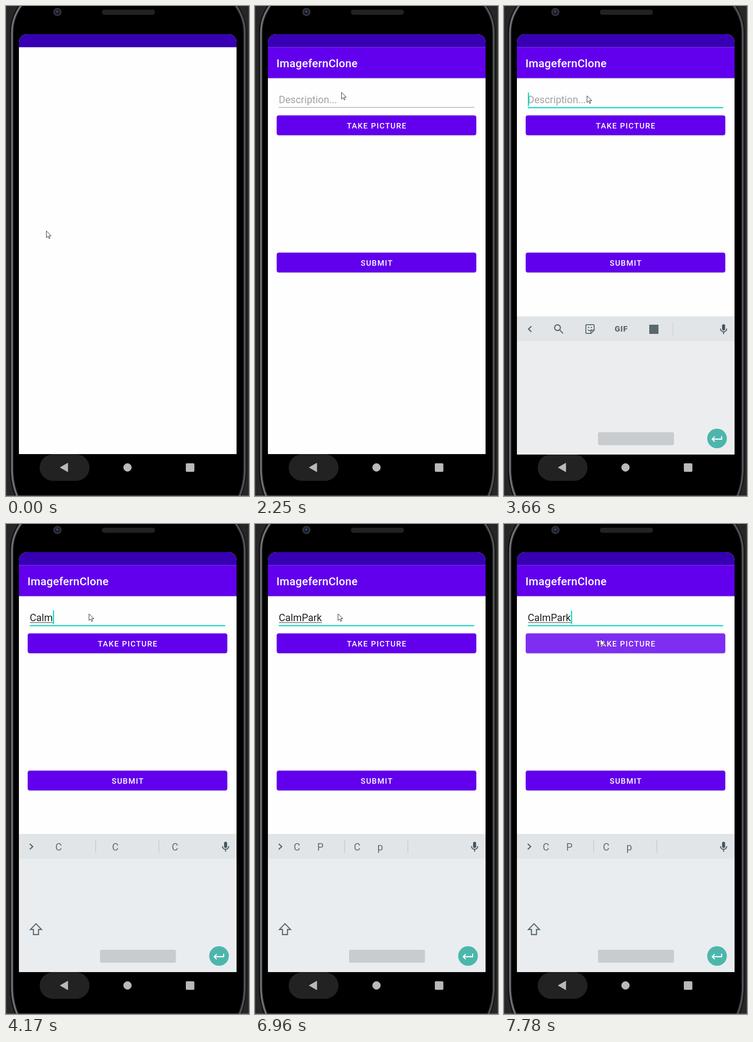
Write an HTML page that moves like this. It is 527 px wide and 1064 px high and loops after 8000 ms.

```html
<!DOCTYPE html>
<html lang="en">
<head>
<meta charset="utf-8">
<title>Photo post form</title>
<style>
  html, body { margin: 0; width: 100%; height: 100%; overflow: hidden; background: #000; }
  svg { display: block; width: 100%; height: 100%; }
  text { font-family: Roboto, sans-serif; font-size: 21.6px; white-space: pre; }
  .medium { font-weight: 500; fill: #fff; }
  .label { font-size: 16.8px; letter-spacing: 1.5px; text-anchor: middle; }
  .line { fill: none; stroke: #5a686e; stroke-width: 2.4; }
  #suggestions text { fill: #626c71; }
</style>
</head>
<body>
<svg viewBox="0 0 527 1064">
  <defs>
    <path id="edge" d="M33-2C22 14 13 32 13 58V1005C13 1030 17 1048 26 1068"/>
    <g id="side" fill="none">
      <use href="#edge" stroke="#0a0a0a" stroke-width="9"/>
      <use href="#edge" stroke="#4b4e50" stroke-width="5"/>
      <use href="#edge" stroke="#74797c" stroke-width="2.400"/>
    </g>
    <clipPath id="screen"><path d="M28 973V79a18 18 0 0 1 18-18H482a18 18 0 0 1 18 18V973z"/></clipPath>
    <g id="button">
      <rect x="47" y="1" width="433" height="43" rx="4.500" opacity=".18"/>
      <rect x="47" width="433" height="43" rx="4.500" fill="#6200ee"/>
    </g>
  </defs>

  <!-- Phone body -->
  <rect width="527" height="1064" fill="#262626"/>
  <path d="M.5 0V1064M526.5 0V1064" stroke="#484848"/>
  <path d="M33-2C22 14 13 32 13 58V1005C13 1030 17 1048 26 1068H504C513 1048 517 1030 517 1005V58C517 32 508 14 497-2z"/>
  <use href="#side"/>
  <use href="#side" transform="translate(530.500) scale(-1 1)" opacity=".65"/>
  <path d="M0 1063.5H527" stroke="#777"/>
  <circle cx="111.500" cy="13" r="9" fill="#303032"/>
  <circle cx="111.500" cy="13" r="5.500" fill="#171d30"/>
  <circle cx="111" cy="12" r="2" fill="#3c5289"/>
  <rect x="208" y="8" width="115" height="11" rx="5" fill="#222"/>

  <!-- Navigation bar -->
  <rect x="73" y="973.500" width="108" height="57.500" rx="28.700" fill="#222"/>
  <g fill="#b9b9b9" stroke="#b9b9b9" stroke-linejoin="round">
    <path d="M117.500 1002L134 992.500V1011.500z"/>
    <circle cx="263.500" cy="1002" r="8.500"/>
    <rect x="390.500" y="993.500" width="17.500" height="17.500" rx="1.500"/>
  </g>

  <!-- App -->
  <g clip-path="url(#screen)">
    <rect x="28" y="61" width="472" height="912" fill="#fefefe"/>
    <rect x="28" y="61" width="472" height="28.500" fill="#3700b3"/>
    <g id="form">
      <rect x="28" y="156" width="472" height="2" opacity=".14"/>
      <rect x="28" y="89.500" width="472" height="67" fill="#6200ee"/>
      <text x="46.500" y="133" class="medium" style="font-size:24.04px;letter-spacing:.3px">ImagefernClone</text>
      <text id="hint" x="51.500" y="211" fill="#a3a3a3">Description...</text>
      <text id="entry" x="51.500" y="211" fill="#222"></text>
      <rect id="composing" x="52" y="213.500" height="1.300" fill="#555"/>
      <rect id="underline" x="51.500" y="219.600" width="424"/>
      <rect id="caret" y="188" width="2.400" height="29.500" fill="#03dac5"/>
      <use href="#button" y="237.500"/>
      <rect id="pressed" x="47" y="237.500" width="433" height="43" rx="4.500" fill="#fff"/>
      <text x="264.300" y="266" class="medium label">TAKE PICTURE</text>
      <use href="#button" y="535.500"/>
      <text x="264.300" y="564" class="medium label">SUBMIT</text>
    </g>
  </g>

  <!-- Keyboard -->
  <g id="keyboard">
    <rect id="keys" x="28" y="673" width="472" height="300"/>
    <rect x="28" y="673" width="472" height="53.500" fill="#e1e5e8"/>
    <g id="tools" class="line">
      <path d="M59.500 694.500L53 700.500L59.500 706.500"/>
      <circle cx="116" cy="697.500" r="6.300"/>
      <path d="M120.500 702L128 710"/>
      <path d="M179.500 691H193.500Q195.500 691 195.500 693V703L188.500 710H179.500Q177.500 710 177.500 708V693Q177.500 691 179.500 691zM195 703H188.500V710" stroke-width="2"/>
      <path d="M182 702Q186 706.500 190.500 701.500M182 697H185M188 697H191" stroke-width="1.900"/>
      <text x="240" y="706" style="font-size:17px;font-weight:900;letter-spacing:.9px" fill="#5a686e" stroke="none">GIF</text>
      <rect x="315" y="691" width="20" height="20" fill="#5a686e" stroke="none"/>
      <path d="M366.500 687V714" stroke="#c5cacd" stroke-width="1.200"/>
    </g>
    <g id="candidates">
      <path class="line" d="M51.500 694.500L58 700.500L51.500 706.500"/>
      <path d="M194.500 686V714M331.500 686V714" stroke="#bfc4c7" stroke-width="1.200"/>
      <g id="suggestions"></g>
      <path class="line" d="M65 868L53 880.500H59.500V891.500H70.500V880.500H77z"/>
    </g>
    <rect x="473" y="690" width="6.500" height="13.500" rx="3.200" fill="#46555c"/>
    <path class="line" d="M469.500 699.500A6.700 7 0 0 0 483 699.500M476.200 706.500V711.500" stroke-width="2"/>
    <rect x="204" y="924.500" width="164.500" height="28" rx="3" fill="#c8cccf"/>
    <circle cx="462" cy="938" r="21.300" fill="#4db6ac"/>
    <path d="M472 933V939.500H452M457 934L451.500 939.500L457 945" fill="none" stroke="#fff" stroke-width="2.300"/>
  </g>

  <path id="pointer" d="M.5.5V15L4 11.800L6.300 17L8.600 16L6.300 11H11z" fill="#fff" stroke="#222"/>
</svg>
<script>
const LOOP = 8000;
const el = id => document.getElementById(id);
const show = (id, on) => { el(id).style.display = on ? '' : 'none'; };
const set = (id, attrs) => {
  for (const name in attrs) el(id).setAttribute(name, attrs[name]);
};

// Every track is a list of [start time, ...values] held until the next entry.
const at = (track, t) => track.findLast(step => step[0] <= t).slice(1);

const pointer = [
  [0, 87, 488], [1670, 117, 363], [1820, 158, 262], [1950, 177, 210],
  [2100, 194, 180], [2250, 187, 187], [2380, 179.5, 194.5],
  [7090, 188, 203], [7230, 200, 230], [7360, 208.5, 249.5]
];
const typing = [
  [0, ''], [3930, 'C'], [4050, 'Cal'], [4170, 'Calm'],
  [5140, 'CalmPa'], [5530, 'CalmPar'], [6490, 'CalmPark']
];
const caret = [
  [0, false], [2640, true], [3540, false], [3660, true], [4700, false],
  [5140, true], [5940, false], [6490, true], [6960, false], [7510, true]
];
const suggestions = [
  [0],
  [3930, 'C', 107, 'C', 230, 'C', 359.5],
  [5140, 'C', 94.5, 'P', 145, 'C', 221, 'p', 272, 'C', 354.5],
  [5530, 'C', 90.5, 'P', 141, 'C', 218, 'p', 269, 'C', 354.5],
  [6490, 'C', 84, 'P', 135, 'C', 214.5, 'p', 265.5]
];
const press = [[0, 0], [7650, .1], [7780, .18]];

function suggestionMarkup(items) {
  let markup = '';
  for (let i = 0; i < items.length; i += 2)
    markup += `<text x="${items[i + 1]}" y="709">${items[i]}</text>`;
  return markup;
}

function draw(t) {
  const [text] = at(typing, t);
  const focused = t >= 2520;
  const sliding = t < 3810;

  show('form', t >= 840);
  show('hint', !text);
  el('entry').textContent = text;
  const width = text ? el('entry').getComputedTextLength() : 0;
  set('composing', { width });
  set('caret', { x: 51.8 + width });
  show('caret', at(caret, t)[0]);
  set('underline', focused
    ? { height: 2.4, fill: t < 2640 ? '#45c9bb' : '#03dac5' }
    : { height: 1.2, fill: '#999' });
  set('pressed', { opacity: at(press, t)[0] });

  show('keyboard', t >= 3660);
  set('keyboard', { transform: `translate(0 ${sliding ? 1 : 0})` });
  set('keys', { fill: sliding ? '#ecedef' : '#e9edf0' });
  show('tools', !text);
  show('candidates', text);
  el('suggestions').innerHTML = suggestionMarkup(at(suggestions, t));

  set('pointer', { transform: `translate(${at(pointer, t)})` });
}

function tick() {
  draw(performance.now() % LOOP);
  requestAnimationFrame(tick);
}
tick();
</script>
</body>
</html>
```
